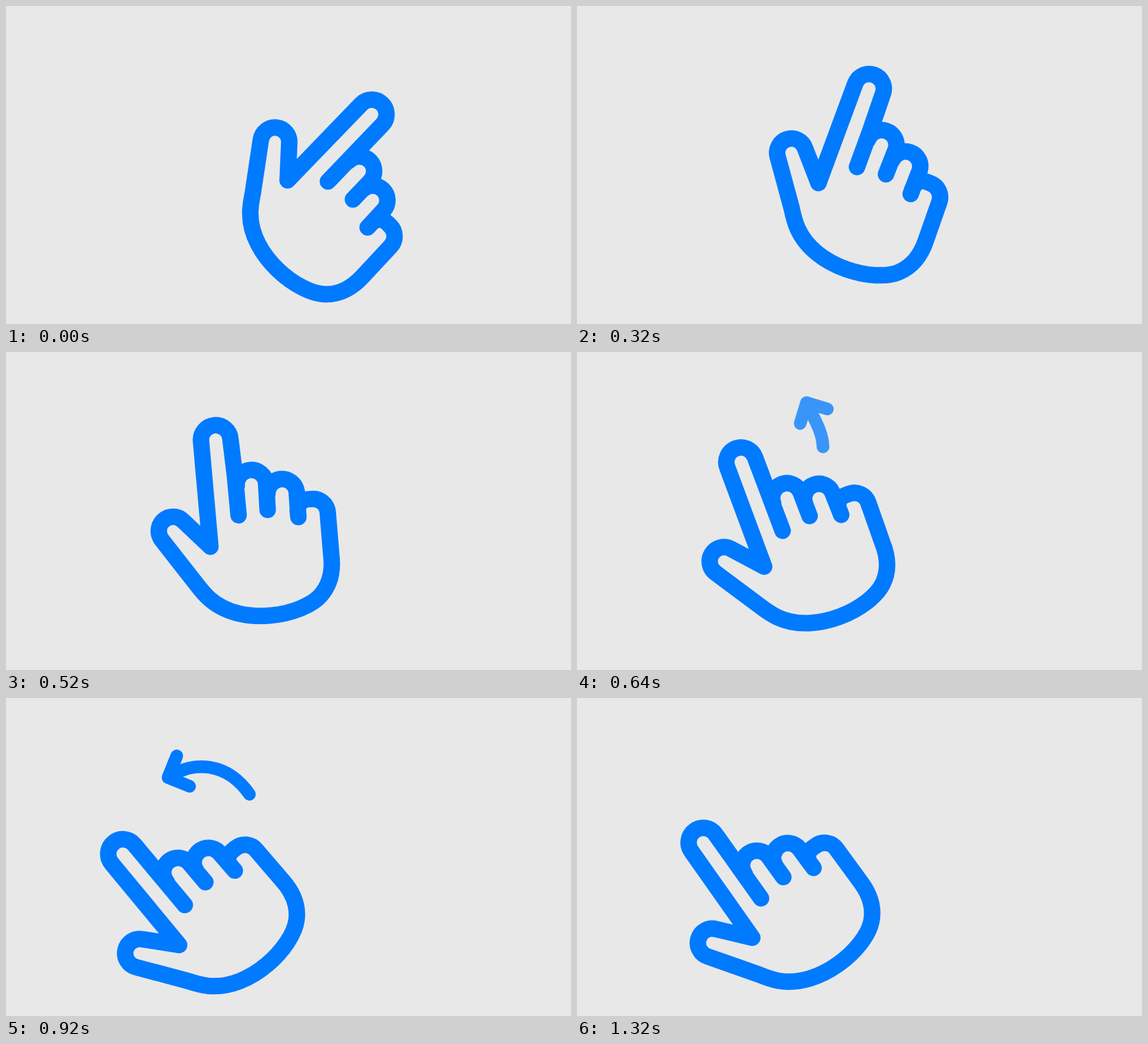
An HTML page for the animation above (1.92 s loop, 960 by 540 pixels).

```html
<!DOCTYPE html>
<html lang="en">
<head>
<meta charset="utf-8">
<title>Swipe left</title>
<style>
  html, body { margin: 0; width: 100%; height: 100%; overflow: hidden; background: #e8e8e8; }
  svg { display: block; width: 100%; height: 100%; }
  path { fill: none; stroke: #007aff; stroke-linecap: round; stroke-linejoin: round; }
  #hand { stroke-width: 28; }
  #arrow { stroke-width: 21.5; }
</style>
</head>
<body>
<svg viewBox="0 0 960 540">
  <path id="hand"/>
  <path id="arrow"/>
</svg>
<script>
const LOOP = 1920, STEP = 40, RAD = Math.PI / 180;
const { sin, cos, min, max, PI } = Math;

const hand = document.getElementById('hand');
const arrow = document.getElementById('arrow');

const clamp = v => min(1, max(0, v));
const progress = (t, from, to) => clamp((t - from) / (to - from));
const lerp = (a, b, u) => a + (b - a) * u;
const smooth = u => u * u * (3 - 2 * u);
const hump = (t, from, to) => sin(PI * progress(t, from, to));

// Same as CSS cubic-bezier(x1, 0, x2, 1).
function ease(x1, x2, x) {
  let lo = 0, hi = 1;
  for (let i = 0; i < 24; i++) {
    const s = (lo + hi) / 2, r = 1 - s;
    if (3 * s * r * (x1 * r + x2 * s) + s * s * s < x) lo = s; else hi = s;
  }
  return smooth(lo);
}

// Swing past the resting angle, then settle back.
const angle = t => -84 * ease(0.307, 0.771, progress(t, 0, 880))
  + 4.8 * smooth(progress(t, 880, 1120));

function drawHand(t) {
  const turn = angle(t), s = sin(turn * RAD), c = cos(turn * RAD);
  // the fingers first sink towards the palm, then stretch away from it
  const sink = 13 * hump(t, 0, 320) - 4.8 * hump(t, 320, 800);
  const dx = sink * (s - 0.28 * c), dy = sink * (c + 0.28 * s);
  const lag = hump(t, 240, 640);

  const p = (x, y) => `${(x + dx).toFixed(2)} ${(y + dy).toFixed(2)}`;
  const k = (x, y) => p(x + 4 * lag, y - lag);
  const arc = (r, end) => `A${r} ${r} 0 0 1 ${end}`;

  hand.setAttribute('transform', `rotate(${turn} 455.3 460.7)`);
  hand.setAttribute('d', [
    // palm, from the little finger round to the thumb
    'M' + p(653.1, 408.5), 'L607 458',
    'C589 478 569 490 543 489.5',
    'C498 489 415 426 415 352',
    'C415 340 417 329 419.5 317',
    // thumb and index finger
    'L' + p(433, 227.2), arc(24.3, p(481.3, 232.3)),
    'L' + p(478.5, 296),
    'L' + p(603.4, 166.7), arc(25, p(639.6, 201.3)),
    'L' + k(593.3, 249.7), 'L' + k(547, 298),
    // middle, ring and little finger
    'M' + k(582.4, 263.2), arc(25, k(618.6, 297.8)),
    'L' + p(589.5, 328.5),
    'M' + k(606, 311.7), arc(25, k(642, 346.3)),
    'L' + p(614.5, 376),
    'L' + p(621.5, 368.5), arc(18, p(647.5, 368)),
    'L' + p(652.5, 373), arc(25, p(653.1, 408.5))
  ].join(''));
}

// Shaft curve when short and when fully grown.
const SHORT = [418, 161, 417, 135, 405, 118, 390, 86];
const LONG = [412.5, 164, 365, 102.5, 297, 102.5, 250, 161.5];

function drawArrow(t) {
  const grow = sin(PI / 2 * min(1, (t - 640) / 480));
  const shaft = SHORT.map((v, i) => lerp(v, LONG[i], grow));
  const lift = sin(PI * grow);
  const x = shaft[6] -= 6 * lift;
  const y = shaft[7] -= 18 * lift;

  const size = 37 + 4 * grow * grow;
  const arm = deg => {
    const a = (deg + 107 * (1 - grow)) * RAD;
    return `${x + size * cos(a)} ${y + size * sin(a)}`;
  };
  const [x0, y0, ...rest] = shaft;
  arrow.setAttribute('d', `M${x0} ${y0}C${rest.join(' ')}M${arm(-90)}L${x} ${y}L${arm(0)}`);
  arrow.style.opacity = min(progress(t, 560, 667), 1 - progress(t, 1120, 1320));
  arrow.style.strokeLinejoin = grow < 1 ? 'bevel' : 'round';
}

const start = performance.now();
function tick() {
  const t = (performance.now() - start) % LOOP;
  const held = Math.floor(t / STEP) * STEP;
  drawHand(held);
  drawArrow(held);
  requestAnimationFrame(tick);
}
tick();
</script>
</body>
</html>
```
